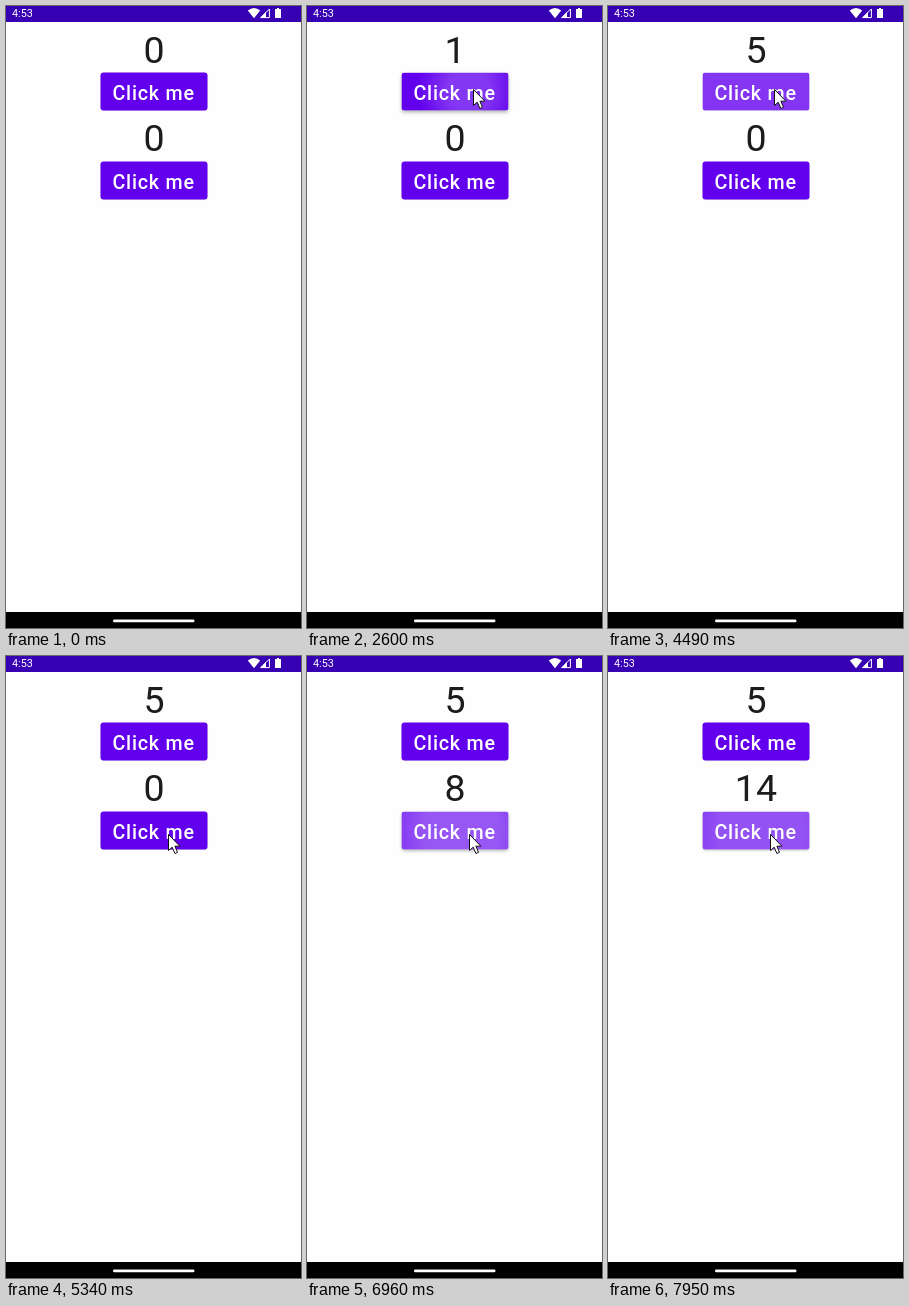
An HTML page for the animation above (8 s loop, 295 by 622 pixels).

```html
<!DOCTYPE html>
<html lang="en">
<head>
<meta charset="utf-8">
<title>Two counters</title>
<style>
  html, body { margin: 0; width: 100%; height: 100%; overflow: hidden; background: #fefefe; }
  .button { position: absolute; left: 94px; width: 107.4px; height: 38.3px; border-radius: 3px; transform: translate(.5px, .6px); }
  svg { position: absolute; left: 0; top: 0; font-family: Roboto, sans-serif; }
  .count { font-size: 37.5px; letter-spacing: .2px; text-anchor: middle; fill: #1c1c1e; }
  .label { font-size: 19.7px; font-weight: 500; letter-spacing: .8px; fill: #fff; }
</style>
</head>
<body>
<div class="button" style="top:66px"></div>
<div class="button" style="top:155px"></div>
<svg width="295" height="622" viewBox="0 0 295 622">
  <rect width="295" height="16" fill="#3700b3"/>
  <g fill="#fff">
    <text x="6" y="11" font-size="10.8">4:53</text>
    <path d="M241.8 4.6Q248 -.4 254.2 4.6L248 12.2Z"/>
    <path d="M254.8 11.6L263.4 3V11.6Z" fill="none" stroke="#fff"/>
    <path d="M254 12L260 6V12Z"/>
    <path d="M269 3h2v-1h2v1h2v9h-6z"/>
  </g>
  <rect y="606" width="295" height="16"/>
  <rect x="107" y="613.5" width="81.5" height="2.8" rx="1.4" fill="#fff"/>
  <text class="count" x="148.1" y="56.5"></text>
  <text class="label" x="106.4" y="94">Click me</text>
  <text class="count" x="148.1" y="145.4"></text>
  <text class="label" x="106.4" y="183">Click me</text>
  <path id="cursor" d="M0 0V16L3.7 12.7L6.4 19L9 17.8L6.4 11.7H11.4Z" fill="#fff" stroke="#111"/>
</svg>
<script>
const LOOP = 8000, STEP = 140, OFFSET = 100;

// Pointer stops: time, x, y
const path = [[1350, 276, 257], [1850, 166.5, 83.5], [4500, 166.5, 83.5],
  [4950, 160, 179.5], [5250, 162.5, 178.5]];

// The time of each button's k-th click, its number of clicks and the press point
const buttons = [
  { clickAt: k => 2420 + 580 * k - 32.5 * k * k, total: 5, press: [72, 16.5] },
  { clickAt: k => 5712 + 160 * k, total: 14, press: [68, 22.5] }
];
const boxes = document.querySelectorAll('.button');
const counts = document.querySelectorAll('.count');
const cursor = document.getElementById('cursor');

const clamp = v => Math.max(0, Math.min(1, v));
const mix = (a, b, k) => a + (b - a) * k;

function cursorAt(t) {
  const i = path.findIndex(p => p[0] > t);
  if (i < 0) return path[path.length - 1].slice(1);
  const [a, b] = [path[i - 1], path[i]];
  const k = (t - a[0]) / (b[0] - a[0]);
  const e = k * k * (3 - 2 * k);
  return [mix(a[1], b[1], e), mix(a[2], b[2], e)];
}

// A soft disc that grows from the press point and drifts to the middle.
function ripple(age, [px, py]) {
  const grow = clamp(age / 225);
  const alpha = .27 * clamp(age / 75) * clamp((350 - age) / 170);
  const x = mix(px, 53.7, grow), y = mix(py, 19, grow);
  return `radial-gradient(circle ${mix(40, 200, grow * grow)}px at ${x}px ${y}px,` +
    `rgba(255,255,255,${alpha}) 40%,rgba(255,255,255,0))`;
}

function drawButton({ clickAt, total, press }, i, t) {
  const layers = ['#6200ee'];
  let count = 0, lift = 0;
  while (count < total && clickAt(count) <= t) {
    const age = t - clickAt(count++);
    if (age < 350) layers.unshift(ripple(age, press));
    lift = Math.sin(Math.PI * clamp(age / 170));
  }
  counts[i].textContent = count;
  boxes[i].style.background = layers.join(',');
  boxes[i].style.boxShadow =
    `0 ${mix(.5, 2, lift)}px ${mix(1, 4, lift)}px rgba(0,0,0,${mix(.1, .3, lift)})`;
}

function draw(now) {
  // The screen refreshes in steps, not smoothly.
  const t = Math.floor((now % LOOP - OFFSET) / STEP) * STEP + OFFSET;
  buttons.forEach((b, i) => drawButton(b, i, t));
  const shown = t >= path[0][0];
  cursor.style.display = shown ? '' : 'none';
  if (shown) cursor.setAttribute('transform', `translate(${cursorAt(t)})`);
}

let start;
function loop(now) {
  start ??= now;
  draw(Math.max(0, now - start));
  requestAnimationFrame(loop);
}
draw(0);
requestAnimationFrame(loop);
</script>
</body>
</html>
```
